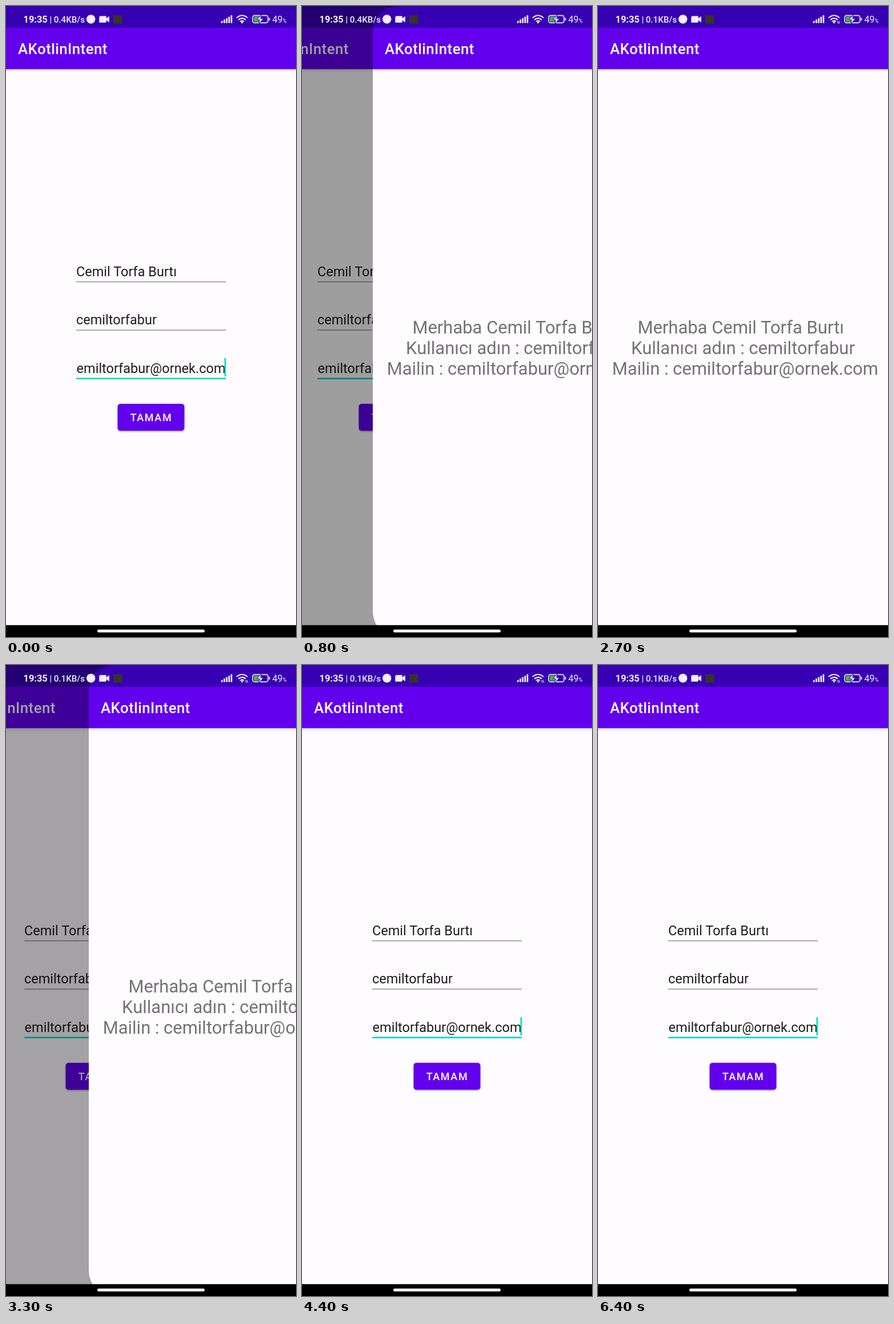
An HTML page that plays this animation: 508x1102 px, repeating every 6500 ms.

```html
<!DOCTYPE html>
<html lang="tr">
<head>
<meta charset="utf-8">
<title>AKotlinIntent</title>
<style>
  html, body { margin: 0; width: 100%; height: 100%; overflow: hidden; background: #000; }
  svg { display: block; }
  text { font-family: Roboto, "Noto Sans", sans-serif; white-space: pre; }
  .title { font-size: 25.8px; font-weight: 500; letter-spacing: .45px; fill: #fff; }
  .field { font-size: 23.5px; fill: #1d1c1e; }
  .message { font-size: 30.96px; fill: #737274; text-anchor: middle; }
  .button { font-size: 18px; font-weight: 500; letter-spacing: 1.6px; fill: #fff; }
  .status { fill: #f3effb; }
</style>
</head>
<body>
<svg width="508" height="1102" viewBox="0 0 508 1102">
  <defs>
    <linearGradient id="barShade" x2="0" y2="1">
      <stop offset="0" stop-opacity=".13"/>
      <stop offset="1" stop-opacity="0"/>
    </linearGradient>
    <filter id="lift" x="-10%" y="-20%" width="120%" height="150%">
      <feDropShadow dx="0" dy="1.6" stdDeviation="1.3" flood-opacity=".32"/>
    </filter>
    <clipPath id="sheet"><rect id="sheetShape" width="508" height="1102"/></clipPath>
    <g id="page">
      <rect y="109" width="508" height="993" fill="#fefcff"/>
      <rect y="110" width="508" height="6" fill="url(#barShade)"/>
      <rect y="38" width="508" height="72.3" fill="#6200ee"/>
      <rect width="508" height="38" fill="#3700b3"/>
      <text class="title" x="21" y="84">AKotlinIntent</text>
    </g>
  </defs>

  <g id="form">
    <use href="#page"/>
    <text class="field" x="123" y="472" id="nameField"></text>
    <text class="field" x="123" y="556.3" id="userField"></text>
    <svg x="123" y="605" width="262" height="50" overflow="hidden">
      <text class="field" x="261.5" y="35.7" text-anchor="end" id="mailField"></text>
    </svg>
    <g fill="#818083">
      <rect x="123" y="481" width="262" height="1.3"/>
      <rect x="123" y="565.4" width="262" height="1.3"/>
    </g>
    <g fill="#03dac5">
      <rect x="123" y="649.3" width="262" height="2.7"/>
      <rect id="cursor" x="382.6" y="615" width="2.6" height="32"/>
    </g>
    <rect x="195.5" y="694.7" width="117" height="47" rx="5" fill="#6200ee" filter="url(#lift)"/>
    <text class="button" x="217.8" y="725">TAMAM</text>
  </g>
  <rect id="scrim" width="508" height="1102"/>

  <g id="result">
    <g clip-path="url(#sheet)">
      <use href="#page"/>
      <text class="message" x="250.2" y="572" id="helloLine"></text>
      <text class="message" x="254" y="608.2" id="userLine"></text>
      <text class="message" x="257.8" y="644.4" id="mailLine"></text>
    </g>
  </g>

  <g class="status">
    <text x="30.5" y="29" font-size="16.4" font-weight="600">19:35</text>
    <text x="76.5" y="29" font-size="15.2" font-weight="500">|</text>
    <text x="83.7" y="29" font-size="15.2" font-weight="500" id="speed"></text>
    <circle cx="148.7" cy="23" r="7.7"/>
    <path d="M164.5 17.5h10q1.3 0 1.3 1.3v3l5-4v11l-5-4v3q0 1.3-1.3 1.3h-10q-1.3 0-1.3-1.3v-8q0-1.3 1.3-1.3z"/>
    <rect x="188" y="16" width="15.5" height="15" fill="#35332a"/>
    <g id="signal"></g>
    <g fill="none" stroke="#f3effb" stroke-width="2.1">
      <path d="M404 20.6Q413.5 12.4 423 20.6M407 24.2Q413.5 18.6 420 24.2M409.9 27.3Q413.5 24.2 417.1 27.3"/>
      <rect x="432" y="16.6" width="27" height="12.8" rx="3.6" stroke-width="1.6"/>
    </g>
    <circle cx="413.5" cy="28.7" r="1.7"/>
    <path id="traffic" d="M419.8 31v-3h-1l1.6-2 1.6 2h-1v3zM422.4 26v3h-1l1.5 2 1.5-2h-1v-3z"/>
    <rect x="434" y="18.6" width="10.5" height="8.8" rx="1.6" fill="#43b649"/>
    <path d="M447.6 15l-8.2 9h4.9l-1.5 7.3 8.3-9.3h-5.2z" stroke="#3700b3" stroke-width="1"/>
    <rect x="460.4" y="20.5" width="2" height="5" rx="1"/>
    <text x="466.5" y="29" font-size="16">49</text>
    <text x="484.8" y="29" font-size="8.8" font-weight="500">%</text>
  </g>

  <rect y="1081.3" width="508" height="20.7"/>
  <rect x="160" y="1089" width="188" height="5" rx="2.5" fill="#fff"/>
</svg>
<script>
const LOOP = 6500, STEP = 100, WIDTH = 508, CORNER = 44;
const OPEN_AT = 626.5, CLOSE_AT = 3232.6, SPEED_AT = 2400;
const OMEGA = 2 * Math.PI / 400;

const $ = id => document.getElementById(id);
const user = { name: "Cemil Torfa Burtı", login: "cemiltorfabur", mail: "cemiltorfabur@ornek.com" };

$("nameField").textContent = user.name;
$("userField").textContent = user.login;
$("mailField").textContent = user.mail;
$("helloLine").textContent = `Merhaba ${user.name}`;
$("userLine").textContent = `Kullanıcı adın : ${user.login}`;
$("mailLine").textContent = `Mailin : ${user.mail}`;

$("signal").innerHTML = [0, 1, 2, 3, 4].map(i => {
  const h = 4 + i * 2.5;
  return `<rect x="${377 + i * 4.15}" y="${30 - h}" width="2.7" height="${h}" rx="1"/>`;
}).join("");

// Critically damped spring from 0 to 1
function spring(ms) {
  if (ms <= 0) return 0;
  const x = OMEGA * ms;
  return 1 - (1 + x) * Math.exp(-x);
}

function cursorOn(t) {
  return t < CLOSE_AT ? t < 500 : (t - 400) % 1000 < 500;
}

function draw(t) {
  const shown = t < CLOSE_AT ? spring(t - OPEN_AT) : 1 - spring(t - CLOSE_AT);
  const x = Math.round(WIDTH * (1 - shown));
  const moving = x > 0 && x < WIDTH;

  $("form").setAttribute("transform", `translate(${Math.round((x - WIDTH) / 4)} 0)`);
  $("result").setAttribute("transform", `translate(${x} 0)`);
  $("sheetShape").setAttribute("rx", moving ? CORNER : 0);
  $("scrim").setAttribute("opacity", (1 - x / WIDTH) / 2);
  $("cursor").setAttribute("opacity", cursorOn(t) ? 1 : 0);
  $("speed").textContent = t < SPEED_AT ? "0.4KB/s" : "0.1KB/s";
  $("traffic").setAttribute("opacity", t < SPEED_AT ? 0 : 0.8);
}

const start = performance.now();
function tick() {
  const t = (performance.now() - start + 5) % LOOP;
  draw(Math.floor(t / STEP) * STEP);
  requestAnimationFrame(tick);
}
tick();
</script>
</body>
</html>
```
